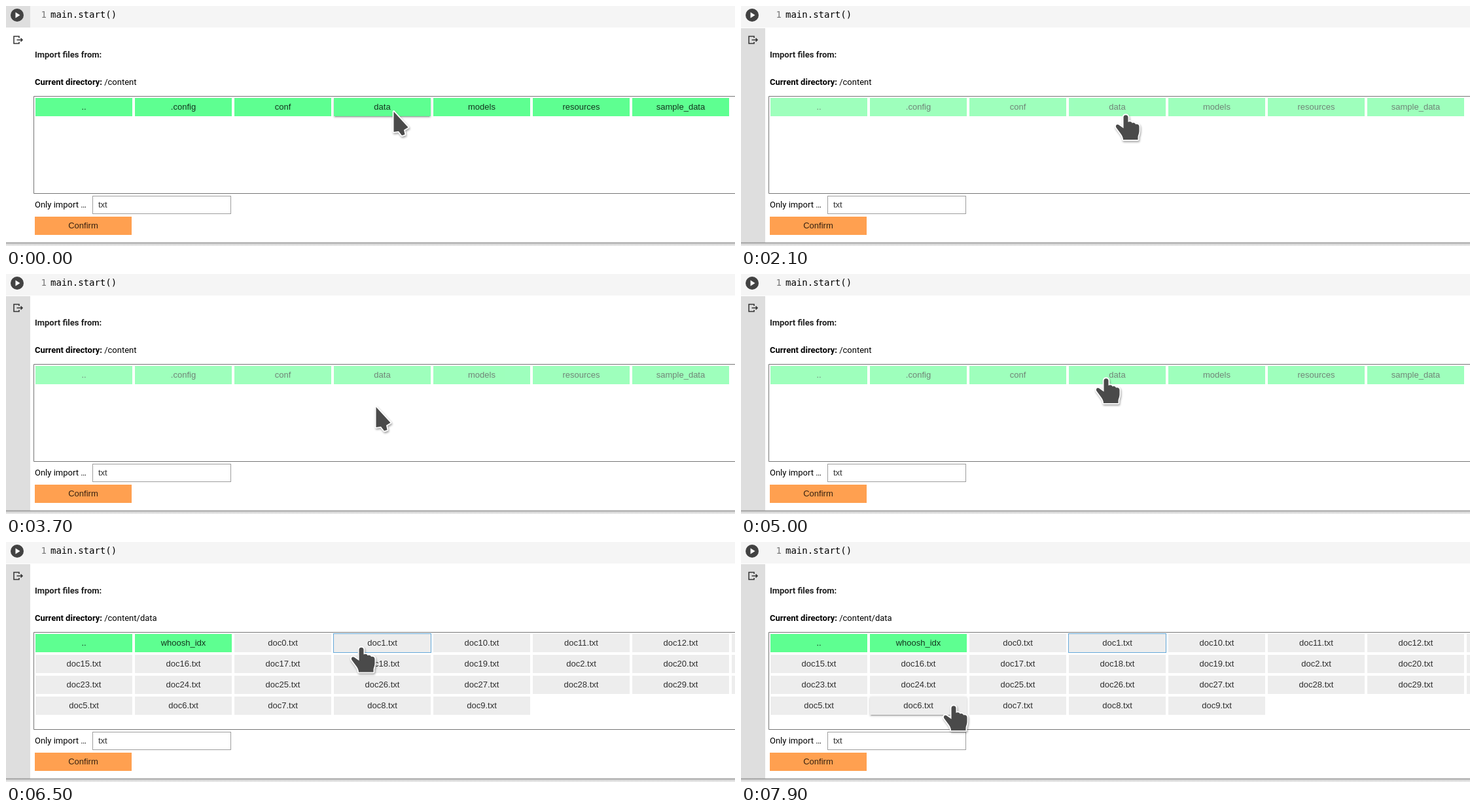
An HTML page that plays this animation: 1114 px wide and 368 px high, repeating every 8000 ms.

```html
<!DOCTYPE html>
<html lang="en">
<head>
<meta charset="utf-8">
<title>File picker</title>
<style>
  html, body { margin: 0; width: 100%; height: 100%; overflow: hidden; background: #fff; }
  svg { position: absolute; left: 0; top: 0; width: 1114px; height: 368px; }
  svg text { font: 13px Roboto, sans-serif; fill: #000; }
  .bold { font-weight: 700; }
  svg .code { font: 14px "DejaVu Sans Mono", monospace; white-space: pre; }
  .button {
    position: absolute; box-sizing: border-box; width: 148px; height: 28px;
    font: 13px/28px "Liberation Sans", Arial, sans-serif; text-align: center;
    color: rgba(0, 0, 0, .8); background: #ededed;
  }
  .folder { background: #5eff91; }
  .confirm { left: 44px; top: 323px; background: #ffa050; }
  .disabled .button { opacity: .6; }
  .hover {
    box-shadow: 0 2px 2px rgba(0, 0, 0, .14), 0 3px 1px -2px rgba(0, 0, 0, .2),
                0 1px 5px rgba(0, 0, 0, .12);
  }
  .focus { outline: 1px solid #64a8d8; }
  #cursor path {
    fill: #4a4a4a; stroke: #fff; stroke-width: 3.6; stroke-linejoin: round; paint-order: stroke;
  }
  #cursor { filter: drop-shadow(1px 2px 1.5px rgba(0, 0, 0, .35)); }
</style>
</head>
<body>
<svg viewBox="0 0 1114 368">
  <rect width="1114" height="33" fill="#f5f5f5"/>
  <rect id="cellGutter" width="37" height="33" fill="#dedede"/>
  <rect id="outputGutter" y="34" width="37" height="329" fill="#dedede"/>
  <linearGradient id="edge" x2="0" y2="1">
    <stop stop-color="#858585"/><stop offset=".4" stop-color="#d2d2d2"/><stop offset="1" stop-color="#eee"/>
  </linearGradient>
  <rect y="362.5" width="1114" height="5.5" fill="url(#edge)"/>
  <circle cx="17" cy="14" r="10" fill="#424242"/>
  <path d="M14.5 9.5V18.5L21.5 14Z" fill="#fff"/>
  <path d="M20 49V46.5H12V57.5H20V55M16.5 52H25M22.5 49.5L25 52L22.5 54.5"
        fill="none" stroke="#333" stroke-width="1.5"/>
  <text class="code" x="53.5" y="18" style="fill:#777">1</text>
  <text class="code" x="68" y="18">main.start()</text>
  <text class="bold" x="44" y="79" style="fill:#212121">Import files from:</text>
  <text x="44" y="121"><tspan class="bold">Current directory:</tspan> <tspan id="directory"></tspan></text>
  <path d="M1120 138.5H42.5V287.5H1120" fill="none" stroke="#757575"/>
  <text x="44" y="309">Only import …</text>
  <rect x="132.5" y="291.5" width="211" height="27" fill="#fff" stroke="#9e9e9e"/>
  <text x="141" y="309" style="font-family:'Liberation Sans',Arial,sans-serif;fill:#333">txt</text>
</svg>
<div class="button confirm">Confirm</div>
<div id="folders"></div>
<div id="files"></div>
<svg viewBox="0 0 1114 368">
  <g id="cursor">
    <path id="arrow" d="M.5 1V32L8 31L13 37.5L17.5 36L16 29L22.5 25Z"/>
    <path id="hand" d="M-3.5 5.5C-3.5 1 3.5 1 3.5 5.5V13C6 11.5 9 12.5 9.5 14.5C12 13.2 14.5 14.3 15 16.5
      C18 15.5 20.5 17 20.5 20V26C20.5 31 19 32 18.5 36V40H-4C-4 36 -6 33 -9 29L-14.5 21.5
      C-16.5 18 -13 15.5 -10.5 17.5L-3.5 22.5Z"/>
  </g>
</svg>
<script>
const LOOP = 8000, TICK = 100, COLUMNS = 9;
const $ = id => document.getElementById(id);

function buildGrid(parent, names) {
  const buttons = {};
  names.forEach((name, i) => {
    const button = document.createElement('div');
    button.className = name.endsWith('.txt') ? 'button' : 'button folder';
    button.textContent = name;
    button.style.left = 45 + 152 * (i % COLUMNS) + 'px';
    button.style.top = 141 + 32 * Math.floor(i / COLUMNS) + 'px';
    parent.append(button);
    buttons[name] = button;
  });
  return buttons;
}

const folders = buildGrid($('folders'),
  ['..', '.config', 'conf', 'data', 'models', 'resources', 'sample_data']);
const documents = Array.from({ length: 30 }, (_, i) => `doc${i}.txt`).sort();
const files = buildGrid($('files'), ['..', 'whoosh_idx', ...documents]);

// Each move: first and last tick, cursor shape, destination.
const moves = [
  [0, 0, 'arrow', 592, 161],
  [500, 500, 'hand', 593, 161],
  [1900, 2100, 'hand', 588, 165],
  [2200, 2400, 'arrow', 574, 185],
  [2800, 2800, 'arrow', 571, 177],
  [3100, 3500, 'arrow', 566, 202],
  [3700, 3700, 'arrow', 565, 203],
  [3800, 4100, 'arrow', 553, 174],
  [4200, 4200, 'hand', 551, 166],
  [4400, 4500, 'hand', 556, 163],
  [4900, 5000, 'hand', 558, 158],
  [6500, 6600, 'hand', 528, 161],
  [6700, 6700, 'arrow', 490, 165],
  [6900, 6900, 'hand', 425, 205],
  [7000, 7000, 'hand', 369, 233],
  [7200, 7300, 'arrow', 281, 286],
  [7700, 7700, 'arrow', 292, 274],
  [7800, 7900, 'hand', 325, 249],
];

function cursorAt(time) {
  const index = moves.findLastIndex(move => move[0] <= time);
  const [start, end, shape, x, y] = moves[index];
  const [, , , fromX, fromY] = moves[Math.max(index - 1, 0)];
  const part = Math.min(1, (time - start + TICK) / (end - start + TICK));
  return { shape, x: fromX + (x - fromX) * part, y: fromY + (y - fromY) * part };
}

const show = (element, visible) => { element.style.display = visible ? '' : 'none'; };

function render(elapsed) {
  const time = Math.floor(elapsed % LOOP / TICK) * TICK;
  const during = (from, to = LOOP) => time >= from && time < to;
  const opened = during(5200);

  show($('cellGutter'), time < 900);
  show($('outputGutter'), time >= 900);
  show($('folders'), !opened);
  show($('files'), opened);
  $('directory').textContent = opened ? '/content/data' : '/content';
  $('folders').classList.toggle('disabled', during(1900, 5200));

  folders.data.classList.toggle('hover', during(0, 1000));
  folders.data.classList.toggle('focus', during(1000, 1900));
  files['doc1.txt'].classList.toggle('hover', during(5200, 5400));
  files['doc1.txt'].classList.toggle('focus', during(5400));
  files['doc25.txt'].classList.toggle('hover', during(6900, 7000));
  files['doc6.txt'].classList.toggle('hover', during(7800));

  const { shape, x, y } = cursorAt(time);
  $('cursor').setAttribute('transform', `translate(${x} ${y})`);
  show($('arrow'), shape === 'arrow');
  show($('hand'), shape === 'hand');
}

const begin = performance.now();
function frame() {
  render(performance.now() - begin);
  requestAnimationFrame(frame);
}
frame();
</script>
</body>
</html>
```
